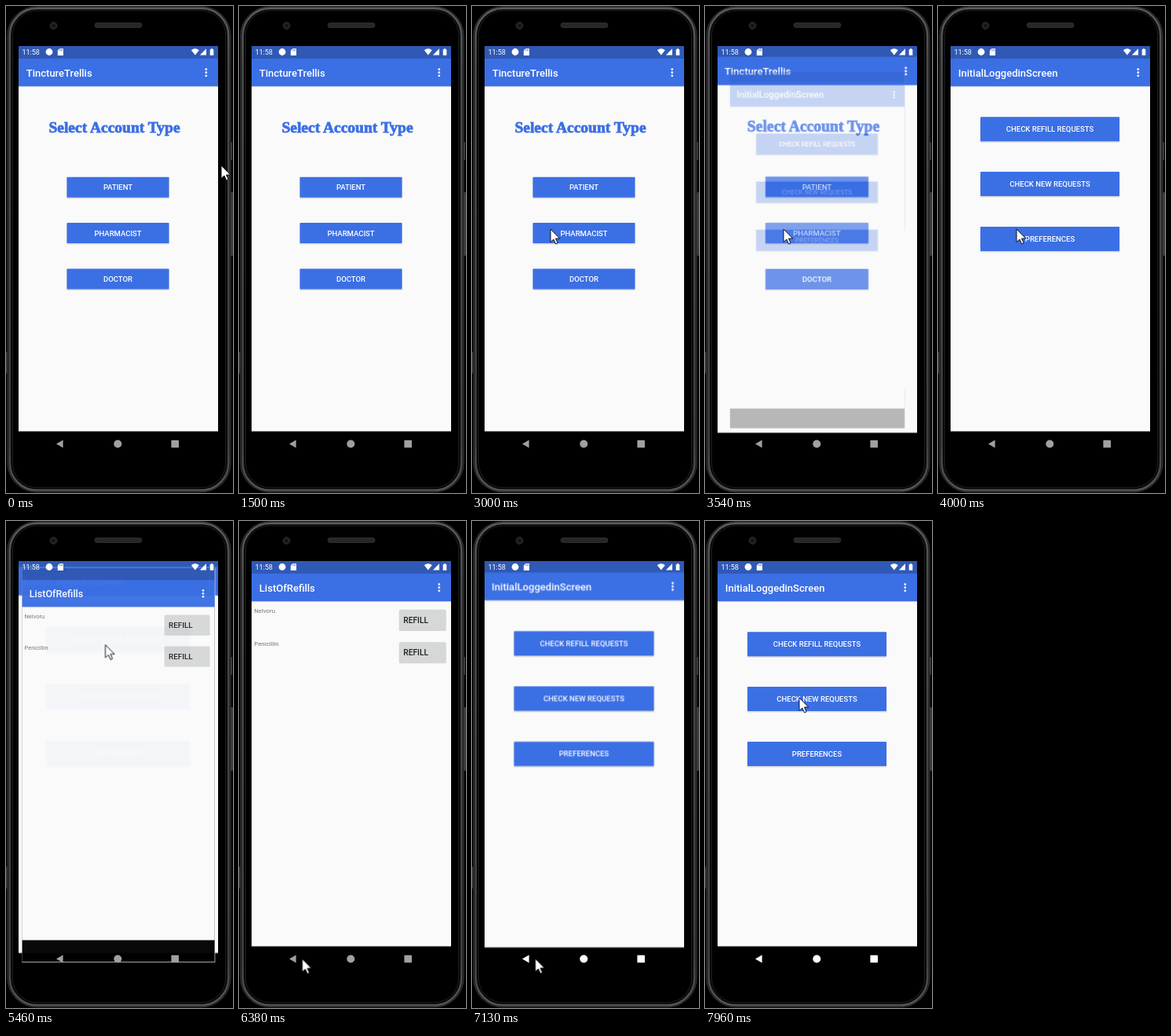
An HTML page that plays this animation: 289 px wide and 620 px high, repeating every 8000 ms.

```html
<!DOCTYPE html>
<html lang="en">
<head>
<meta charset="utf-8">
<title>Account type demo</title>
<style>
  html, body { margin: 0; width: 100%; height: 100%; overflow: hidden; background: #000; }
  svg { display: block; width: 289px; height: 620px; }
  text { font-family: Roboto, sans-serif; }
  .title { font-size: 13px; font-weight: 500; fill: #fff; }
  .label { font-size: 9.5px; font-weight: 500; fill: #fff; text-anchor: middle; }
  .heading {
    font: bold 19.5px "Liberation Serif", serif; text-anchor: middle;
    fill: #3b6fe4; stroke: #3b6fe4; stroke-width: .8px;
  }
  .drug { font-size: 7.8px; fill: #757575; }
  .refill { font-size: 10.2px; font-weight: 500; fill: #212121; }
  .clock { font-size: 9px; fill: #fff; }
  .screen { transform-origin: 142.5px 310px; }
</style>
</head>
<body>
<svg viewBox="0 0 289 620">
  <defs>
    <clipPath id="window"><rect x="16" y="51" width="254" height="519"/></clipPath>
    <linearGradient id="rim" x2="0" y2="1">
      <stop offset="0" stop-color="#5a5c5e"/>
      <stop offset=".12" stop-color="#4a4c4e"/>
      <stop offset=".9" stop-color="#3e4042"/>
      <stop offset="1" stop-color="#55575a"/>
    </linearGradient>
  </defs>

  <rect width="289" height="620" fill="#000"/>
  <g fill="#3a3c3e">
    <rect x="286" y="237" width="3" height="81" rx="1"/>
    <rect x="286" y="173" width="2" height="23" rx="1"/>
    <rect x="0" y="440" width="1.5" height="28" rx=".7"/>
  </g>
  <rect x="2" y=".8" width="284" height="618" rx="37" fill="#18191a" stroke="#38393b"/>
  <rect x="4.8" y="3" width="278.4" height="613.4" rx="34.5" fill="#0a0a0b" stroke="url(#rim)" stroke-width="2.4"/>
  <rect x="8.5" y="6" width="271" height="607" rx="31" fill="#000" stroke="#1c1d1e"/>
  <rect x="113" y="21.5" width="60" height="6" rx="3" fill="#262729" stroke="#38393b" stroke-width=".7"/>
  <circle cx="60.5" cy="25" r="4.3" fill="#1d1f22" stroke="#303236"/>
  <circle cx="60.5" cy="25" r="1.8" fill="#0b1220"/>

  <g id="screens" clip-path="url(#window)"></g>

  <g fill="#fff">
    <text class="clock" x="20.5" y="61.8">11:58</text>
    <circle cx="55" cy="58.5" r="4.4"/>
    <path d="M68.2 54.3H73V63H65.8V56.7Z"/>
    <path d="M68.7 55.4V57.3M70.2 55.4V57.3M71.7 55.4V57.3" stroke="#3059b5" stroke-width=".7"/>
    <path d="M235.8 56.3Q240.8 52.2 245.8 56.3L240.8 62.6Z"/>
    <path d="M255 54.3V62.5H246.8Z"/>
    <path d="M259.7 55.2H261V54.2H263V55.2H264.3V62.7H259.7Z"/>
  </g>
  <g id="nav" fill="#a0a0a0">
    <path d="M64 557.5L72.6 552.5V562.5Z"/>
    <circle cx="142.3" cy="557.5" r="5"/>
    <rect x="210.4" y="552.7" width="9.6" height="9.6" rx=".8"/>
  </g>
  <path id="cursor" d="M0 0V16.5L3.9 13L6.6 19L9.1 17.9L6.5 12H11.7Z" fill="#fff" stroke="#000" stroke-width=".9"/>
</svg>

<script>
const LOOP = 8000;
const BLUE = '#3b6fe4';
const OPEN = 'cubic-bezier(.2,0,0,1)';
const GLIDE = 'ease-in-out';
const NS = 'http://www.w3.org/2000/svg';

function add(parent, tag, attrs, text) {
  const el = document.createElementNS(NS, tag);
  for (const key in attrs) el.setAttribute(key, attrs[key]);
  if (text) el.textContent = text;
  return parent.appendChild(el);
}

function box(parent, x, y, width, height, fill, more) {
  return add(parent, 'rect', { x, y, width, height, fill, ...more });
}

function screen(title) {
  const g = add(document.getElementById('screens'), 'g', { class: 'screen' });
  box(g, 16, 51, 254, 519, '#000');
  box(g, 16, 51, 254, 490.5, '#fafafa');
  box(g, 16, 102, 254, 1.2, '#000', { opacity: .12 });
  box(g, 16, 66.5, 254, 35.7, BLUE);
  box(g, 16, 51, 254, 16, '#3059b5');
  add(g, 'text', { class: 'title', x: 25.8, y: 89.6 }, title);
  for (const cy of [80.6, 84.7, 88.8]) add(g, 'circle', { cx: 254.8, cy, r: 1.4, fill: '#fff' });
  return g;
}

// Raised button; returns its pressed-state overlay.
function button(g, x, y, w, h, label) {
  box(g, x - .4, y + .5, w + .8, h + 1, '#000', { opacity: .14, rx: 1.2 });
  box(g, x, y, w, h, BLUE, { rx: .8 });
  add(g, 'text', { class: 'label', x: x + w / 2, y: y + h / 2 + 3.4 }, label);
  return box(g, x, y, w, h, '#fff', { opacity: 0 });
}

function refillRow(g, name, textY, y) {
  add(g, 'text', { class: 'drug', x: 19.3, y: textY }, name);
  box(g, 203.7, y + .5, 60, 26.6, '#000', { opacity: .15, rx: 1.5 });
  box(g, 204.2, y, 59, 26, '#d6d7d7', { rx: 1.3 });
  add(g, 'text', { class: 'refill', x: 209.3, y: y + 16.8 }, 'REFILL');
}

// Rows are [ms, value, easing]; values hold unless an easing is given.
function play(el, prop, rows) {
  const frames = rows.map(([ms, value, easing = 'step-end']) =>
    ({ offset: ms / LOOP, [prop]: value, easing }));
  frames.push({ offset: 1, [prop]: rows[rows.length - 1][1] });
  el.animate(frames, { duration: LOOP, iterations: Infinity });
}

const scale = s => `scale(${s})`;
const at = (x, y) => `translate(${x}px, ${y}px)`;

const home = screen('TinctureTrellis');
add(home, 'text', { class: 'heading', x: 138, y: 160.5 }, 'Select Account Type');
button(home, 77.5, 217.8, 130, 26, 'PATIENT');
const pharmacist = button(home, 77.5, 276.1, 130, 26, 'PHARMACIST');
button(home, 77.5, 334.4, 130, 26, 'DOCTOR');

const menu = screen('InitialLoggedinScreen');
const checkRefills = button(menu, 54, 141.2, 177, 31, 'CHECK REFILL REQUESTS');
button(menu, 54, 211.1, 177, 31, 'CHECK NEW REQUESTS');
button(menu, 54, 281, 177, 31, 'PREFERENCES');

const list = screen('ListOfRefills');
refillRow(list, 'Nelvoru', 117.3, 112.8);
refillRow(list, 'Penicillin', 158.7, 154.2);

const toMenu = 3500, toList = 5313, back = 6880, span = 400;

play(home, 'transform', [
  [0, scale(1)], [toMenu, scale(1), OPEN], [toMenu + span, scale(1.047)]
]);
play(menu, 'opacity', [
  [0, 0], [toMenu, 0, 'linear'], [toMenu + 153, 1]
]);
play(menu, 'transform', [
  [0, scale(.85)], [toMenu, scale(.85), OPEN], [toMenu + span, scale(1)],
  [toList, scale(1), OPEN], [toList + span, scale(1.047)],
  [back, scale(1.1), OPEN], [back + span, scale(1)]
]);
play(list, 'opacity', [
  [0, 0], [toList, 0, 'linear'], [toList + 153, 1],
  [back, 1, 'linear'], [back + 150, 0]
]);
play(list, 'transform', [
  [0, scale(.85)], [toList, scale(.85), OPEN], [toList + span, scale(1)],
  [back, scale(1), OPEN], [back + span, scale(.9)]
]);

for (const [el, start] of [[pharmacist, toMenu], [checkRefills, toList]]) {
  play(el, 'opacity', [
    [0, 0], [start - 130, 0, 'ease-out'], [start - 40, .22, 'ease-in'], [start + 90, 0]
  ]);
}

play(document.getElementById('nav'), 'fill', [[0, '#a0a0a0'], [back + 60, '#ffffff']]);

const cursor = document.getElementById('cursor');
play(cursor, 'opacity', [[0, 1], [40, 0], [2500, 1]]);
play(cursor, 'transform', [
  [0, at(274, 203)], [2500, at(128, 300), 'ease-out'], [2800, at(100, 284)],
  [4300, at(100, 284), GLIDE], [4950, at(126.5, 157.5)],
  [5850, at(126.5, 157.5), GLIDE], [6340, at(80.5, 557.5)],
  [7120, at(80.5, 557.5), GLIDE], [7600, at(120, 225)]
]);
</script>
</body>
</html>
```
